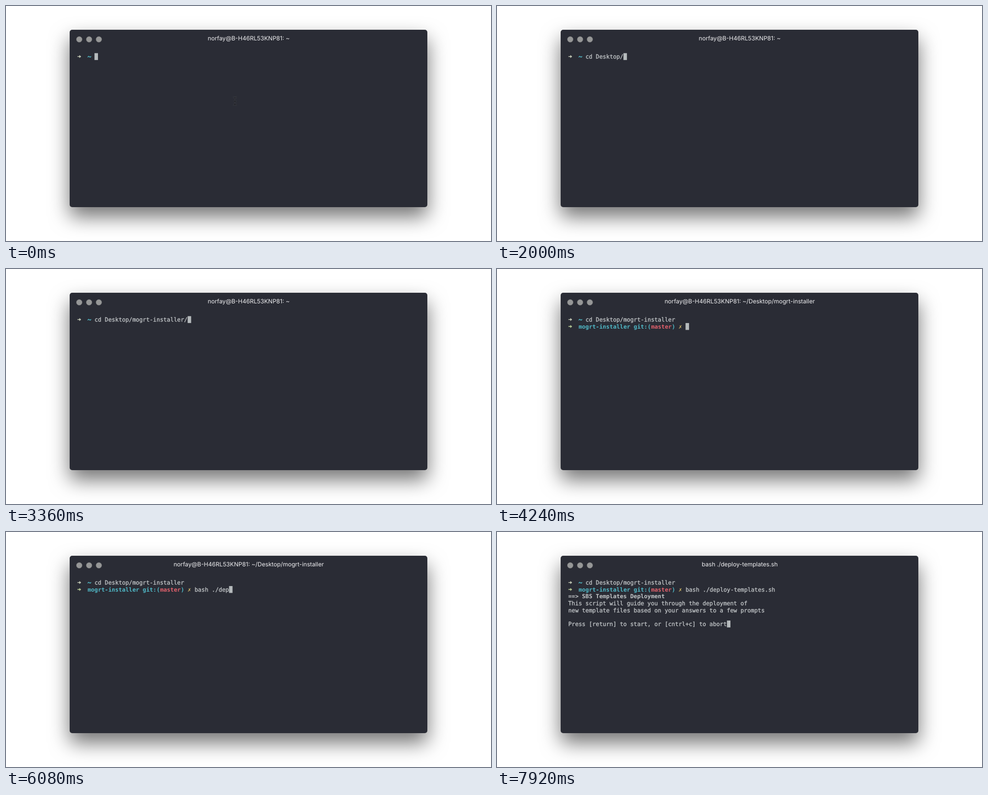
An HTML page for the animation above (8 s loop, 960 px wide and 465 px high).

```html
<!DOCTYPE html>
<html lang="en">
<head>
<meta charset="utf-8">
<title>Terminal session</title>
<style>
  html, body { margin: 0; width: 100%; height: 100%; overflow: hidden; background: #fff; }
  .window {
    position: absolute; left: 126px; top: 47px; width: 708px; height: 351px;
    border-radius: 5px; background: #2a2c35;
    box-shadow: 0 19px 39px rgba(0, 0, 0, .55);
  }
  svg { position: absolute; left: 0; top: 0; }
  text { white-space: pre; text-rendering: geometricPrecision; }
  .mono { font: 11.345px "DejaVu Sans Mono", monospace; fill: #c3c7c9; stroke: #c3c7c9; stroke-width: .3px; }
  .bold { font-weight: bold; stroke: none; }
  .cyan { fill: #50b8c6; }
  .red { fill: #e2616c; }
  .yellow { fill: #d6bd68; }
  #title { font: 11.7px Inter, sans-serif; fill: #f0f0f2; text-anchor: middle; }
</style>
</head>
<body>
<div class="window"></div>
<svg id="stage" width="960" height="465" viewBox="0 0 960 465">
  <g fill="#969797" stroke="#858786" stroke-width=".6">
    <circle cx="145" cy="66" r="5.6"/>
    <circle cx="164.5" cy="66" r="5.6"/>
    <circle cx="183.8" cy="66" r="5.6"/>
  </g>
  <text id="title" x="480.4" y="68"></text>
  <defs>
    <path id="beam" d="M449.5 180q3.7 0 3.7 3v10q0 3-3.7 3M457 180q-3.8 0-3.8 3v10q0 3 3.8 3M451 188.5h4.5"/>
  </defs>
  <g id="pointer" fill="none">
    <use href="#beam" stroke="#50525a" stroke-width="2.2"/>
    <use href="#beam" stroke="#15161a" stroke-width="1.1"/>
  </g>
  <rect id="cursor" width="6.9" height="13.6" fill="#b5babc"/>
</svg>
<script>
const LOOP = 8000, COL = 6.83, ROW = 13.65, LEFT = 141, BASE = 104;
const ENTER_CD = 3680, ENTER_BASH = 7200;
const NS = "http://www.w3.org/2000/svg";
const stage = document.getElementById("stage");
const title = document.getElementById("title");
const pointer = document.getElementById("pointer");
const cursor = document.getElementById("cursor");

function add(tag, attrs, parent = stage) {
  const el = document.createElementNS(NS, tag);
  for (const name in attrs) el.setAttribute(name, attrs[name]);
  return parent.appendChild(el);
}

function write(row, col, str, style = "", parent = stage) {
  const el = add("text", { x: LEFT + col * COL, y: BASE + row * ROW, class: "mono " + style }, parent);
  el.textContent = str;
  return el;
}

function arrow(row, color, parent = stage) {
  const y = 100 + row * ROW;
  add("path", { d: `M141.5 ${y - .8}h3.6v-2.2l3.7 3-3.7 3v-2.2h-3.6z`, fill: color }, parent);
}

arrow(0, "#c4cbb7");
// The home sign is drawn as a wave to keep its full weight
add("path", {
  d: "M162 101.6c.6-2.4 2-2.4 3.1-1.2s2.400 1.200 3-1.200",
  fill: "none", stroke: "#50b8c6", "stroke-width": 1.5
});
const cdLine = write(0, 5, "");

const prompt = add("g", {});
arrow(1, "#b5c894", prompt);
write(1, 3, "mogrt-installer git:(", "bold cyan", prompt);
write(1, 24, "master", "bold red", prompt);
write(1, 30, ")", "bold cyan", prompt);
write(1, 32, "✗", "bold yellow", prompt);
const bashLine = write(1, 34, "", "", prompt);

const output = add("g", {});
write(2, 0, "==> SBS Templates Deployment", "bold", output);
write(3, 0, "This script will guide you through the deployment of", "", output);
write(4, 0, "new template files based on your answers to a few prompts", "", output);
const question = "Press [return] to start, or [cntrl+c] to abort";
write(6, 0, question, "", output);

// Each step: time in ms, text on the command line from then on
const cdKeys = [
  [0, ""], [240, "c"], [320, "cd"], [480, "cd "], [640, "cd D"], [800, "cd De"],
  [960, "cd Des"], [1200, "cd Desktop/"], [2240, "cd Desktop/m"], [2400, "cd Desktop/mo"],
  [2560, "cd Desktop/mog"], [2720, "cd Desktop/mogr"], [2960, "cd Desktop/mogrt-installer/"],
  [ENTER_CD, "cd Desktop/mogrt-installer"]
];
const bashKeys = [
  [0, ""], [4960, "b"], [5120, "ba"], [5200, "bas"], [5280, "bash"], [5440, "bash "],
  [5680, "bash ."], [5760, "bash ./"], [5840, "bash ./d"], [5920, "bash ./de"],
  [6080, "bash ./dep"], [6480, "bash ./deploy-templates.sh"]
];
const typed = (keys, t) => keys.filter(k => k[0] <= t).pop()[1];
const show = (el, on) => el.setAttribute("visibility", on ? "visible" : "hidden");
const host = "norfay@B-H46RL53KNP81: ~";

function draw(t) {
  const cd = typed(cdKeys, t), bash = typed(bashKeys, t);
  const inRepo = t >= ENTER_CD, running = t >= ENTER_BASH;
  cdLine.textContent = cd;
  bashLine.textContent = bash;
  show(prompt, inRepo);
  show(output, running);
  show(pointer, t < 240);
  title.textContent = running ? "bash ./deploy-templates.sh"
    : inRepo ? host + "/Desktop/mogrt-installer" : host;
  const [row, col] = running ? [6, question.length]
    : inRepo ? [1, 34 + bash.length] : [0, 5 + cd.length];
  cursor.setAttribute("x", LEFT + col * COL);
  cursor.setAttribute("y", 93.3 + row * ROW);
}

const start = performance.now();
function tick() {
  draw((performance.now() - start) % LOOP);
  requestAnimationFrame(tick);
}
tick();
</script>
</body>
</html>
```
